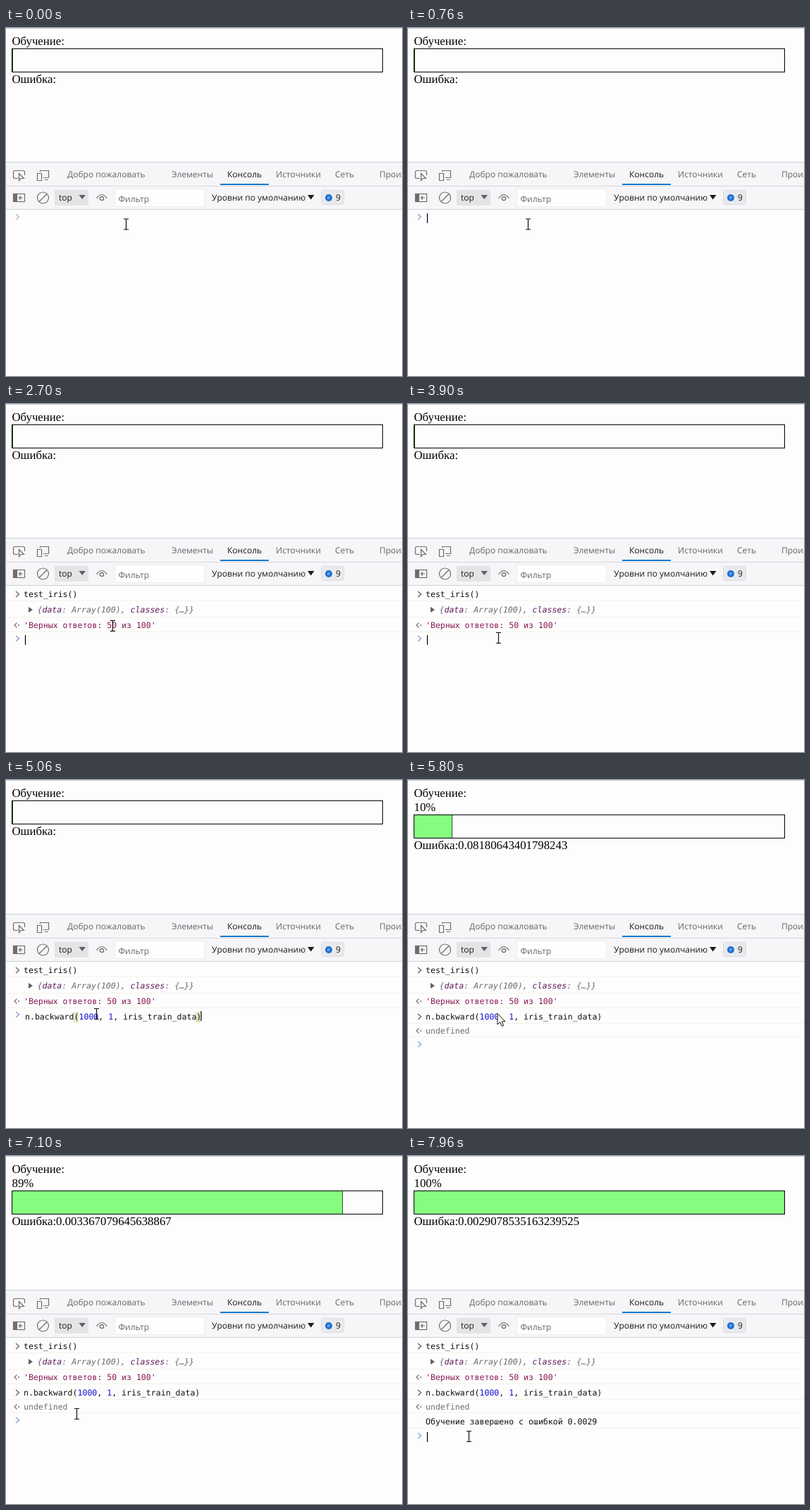
An HTML page that plays this animation: 562 by 494 pixels, repeating every 8 s.

```html
<!DOCTYPE html>
<html lang="ru">
<head>
<meta charset="utf-8">
<style>
  html, body { margin: 0; width: 100%; height: 100%; overflow: hidden; background: #fdfdfd; }
  svg { display: block; width: 562px; height: 494px; }
  text { text-rendering: geometricPrecision; }
  .serif { font: 16.8px "Liberation Serif", serif; fill: #000; }
  .ui { font: 12px "Open Sans", sans-serif; fill: #66666a; }
  .dark { fill: #1c1c1c; }
  .mono { font: 11.55px "DejaVu Sans Mono", monospace; fill: #111; }
  .preview { font-style: italic; fill: #6c6c6c; }
  .icon { fill: none; stroke: #6e6e70; stroke-width: 1.2; }
</style>
</head>
<body>
<svg id="stage" viewBox="0 0 562 494"></svg>
<script>
const LOOP = 8000, BLINK = 530;
const RECALL_1 = 1200, ENTER_1 = 2410, RECALL_2 = 4900, ENTER_2 = 5560;
const TRAIN = 5635, STEP = 16.4, DONE = TRAIN + 100 * STEP;

const text = (x, y, cls, s) => `<text x="${x}" y="${y}" class="${cls}">${s}</text>`;
const rect = (x, y, w, h, attrs) => `<rect x="${x}" y="${y}" width="${w}" height="${h}" ${attrs}/>`;
const path = (d, attrs) => `<path d="${d}" ${attrs}/>`;
const tint = (color, s) => `<tspan fill="${color}">${s}</tspan>`;
const hline = (y, color) => path(`M0 ${y}H562`, `stroke="${color}"`);
const group = (id, body) => `<g id="${id}">${body}</g>`;
const chevron = (y, color = '#606064') =>
  path(`M14 ${y - 4}l4.5 4-4.5 4`, `fill="none" stroke="${color}" stroke-width="1.3"`);
const reply = y =>
  path(`M15.5 ${y - 3.5}l-3.5 3.5 3.5 3.5`, 'fill="none" stroke="#707074" stroke-width="1.2"') +
  `<circle cx="18" cy="${y}" r="1.1" fill="#707074"/>`;
const divider = y => hline(y, '#f3f3ea');

const CALL_1 = 'test_iris()';
const CALL_2 = `n.backward(${tint('#1a10d0', '1000')}, ${tint('#1a10d0', '1')}, iris_train_data)`;
const key = s => tint('#5c1a58', s);

const page =
  hline(0.5, '#cacad4') +
  text(8.5, 24, 'serif', 'Обучение:') +
  '<text id="percent" x="8.5" y="44" class="serif"></text>' +
  group('lower',
    '<rect id="fill" x="9" y="30" height="32" fill="#86fd80"/>' +
    '<path id="edge" stroke="#1c5a1c"/>' +
    rect(8.5, 29.5, 526, 33, 'fill="none" stroke="#000"') +
    '<text id="error" x="8.5" y="78" class="serif"></text>');

const tabs = [[87, 'Добро пожаловать'], [235, 'Элементы'], [314, 'Консоль'],
  [383, 'Источники'], [467, 'Сеть'], [530, 'Производительность']];

const toolbar =
  rect(0, 190, 562, 68, 'fill="#f6f6f8"') +
  hline(190.5, '#cbcbd6') + hline(224.5, '#d8d8de') + hline(257.5, '#d0d0da') +
  tabs.map(([x, s]) => text(x, 212, 'ui' + (s === 'Консоль' ? ' dark' : ''), s)).join('') +
  rect(304, 221, 69, 2, 'fill="#0a78d0"') +
  // inspect and device icons
  path('M17 213.5H12.5Q10.5 213.5 10.5 211.5V204.5Q10.5 202.5 12.5 202.5H24.5Q26.5 202.5 26.5 204.5V209M18.5 206.5V216.5L21 213.5H25.5Z', 'class="icon"') +
  path('M48.5 204V202.5H60.5V212.5H53M55 215.5H60M44.5 206.5H50.5V216.5H44.5Z', 'class="icon"') +
  // sidebar, clear, context, eye
  rect(10.5, 235.5, 16, 11, 'class="icon"') + rect(11, 236, 5, 10, 'fill="#6e6e70"') +
  path('M24 241H18.5M21 238.5L18.5 241L21 243.5', 'class="icon"') +
  '<circle cx="52.5" cy="241" r="8" class="icon"/>' + path('M47 246.5L58 235.5', 'class="icon"') +
  rect(69, 230, 48, 22, 'rx="2" fill="#e4e4e6"') + text(75, 245, 'ui dark', 'top') +
  path('M103.5 237H113L108.2 243Z', 'fill="#606064"') +
  path('M128.5 242Q136 231 143.5 242', 'class="icon"') +
  '<circle cx="136" cy="242" r="2.7" class="icon"/>' +
  rect(154.5, 228.5, 127, 25, 'fill="#fefefe" stroke="#ececee"') +
  text(159.5, 246.5, 'ui', 'Фильтр') +
  text(292, 245, 'ui dark', 'Уровни по умолчанию') + path('M428 237H437.5L432.7 243.5Z', 'fill="#1c1c1c"') +
  rect(447.5, 230.5, 32, 20, 'rx="2" fill="#e9e9ec" stroke="#dcdce0"') +
  '<circle cx="458" cy="241" r="5" fill="#1b6fd8"/>' +
  path('M456 240H460M456 242H459', 'stroke="#cfe0f8" stroke-width="0.8"') +
  text(468, 245, 'ui dark', '9');

const output =
  group('draft1',
    rect(90, 263, 14, 15, 'fill="#e6e6c4"') + path('M90 277.5H104', 'stroke="#8a8a70"') +
    text(27, 274, 'mono', CALL_1)) +
  group('run1',
    chevron(270) + text(25, 274, 'mono', CALL_1) + divider(279.5) +
    path('M32 288V296L38 292Z', 'fill="#606064"') +
    text(44.5, 296, 'mono preview', `{${key('data')}: Array(100), ${key('classes')}: {…}}`) + divider(302.5) +
    reply(314) +
    text(25, 318, 'mono', tint('#861a50', "'Верных ответов: 50 из 100'")) + divider(323.5)) +
  group('draft2',
    rect(96, 329, 7, 15, 'fill="#e6e6c4"') + rect(269, 329, 7, 15, 'fill="#e6e6c4"') +
    text(27, 340, 'mono', CALL_2)) +
  group('run2',
    chevron(336) + text(25, 340, 'mono', CALL_2) + divider(345.5) +
    reply(356) + text(25, 360, 'mono', tint('#707070', 'undefined')) + divider(364.5)) +
  group('finish', text(25, 381, 'mono', 'Обучение завершено с ошибкой 0.0029') + divider(386.5)) +
  group('prompt',
    group('idle', chevron(0, '#b8b8bc')) + group('active', chevron(0, '#86a0cc')) +
    '<path id="caret" d="M0 -5V9" stroke="#000" stroke-width="1.2"/>');

const pointers =
  group('beam', path('M-3.5 -7.5H-1Q0 -7.5 0 -6.5Q0 -7.5 1 -7.5H3.5M0 -6.5V6.5M-3.5 7.5H-1Q0 7.5 0 6.5Q0 7.5 1 7.5H3.5',
    'fill="none" stroke="#111" stroke-width="1.2"')) +
  group('arrow', path('M0 0V15.5L3.7 12.2L6.3 18L8.7 17L6.2 11.3H11Z',
    'fill="#fff" stroke="#111" stroke-linejoin="round"'));

const stage = document.getElementById('stage');
stage.innerHTML = rect(0, 0, 562, 494, 'fill="#fdfdfd"') + page + toolbar + output + pointers;
const el = {};
stage.querySelectorAll('[id]').forEach(n => el[n.id] = n);

const show = (node, on) => node.setAttribute('visibility', on ? 'visible' : 'hidden');
const move = (node, x, y) => node.setAttribute('transform', `translate(${x} ${y})`);

// Returns the segment of sorted points around v, with the fraction inside it.
function segment(points, v) {
  let i = points.length - 1;
  while (i > 0 && points[i][0] > v) i--;
  const a = points[i], b = points[i + 1] || a;
  return [a, b, a === b ? 0 : (v - a[0]) / (b[0] - a[0])];
}

// time, x, y
const MOUSE = [[0, 170.5, 278.5], [2550, 170.5, 278.5], [2900, 122, 371], [3000, 122, 371],
  [3280, 128.5, 332], [5560, 128.5, 332], [5600, 127, 331.5], [6750, 127, 331.5],
  [7060, 100.5, 366], [7250, 100.5, 366], [7600, 86.5, 398]];

function mouseAt(t) {
  const [a, b, u] = segment(MOUSE, t), e = u * u * (3 - 2 * u);
  return [a[1] + (b[1] - a[1]) * e, a[2] + (b[2] - a[2]) * e];
}

// percent, error
const ERRORS = [[0, 0.6127309415582736], [3, 0.3214067718293504], [10, 0.08180643401798243],
  [22, 0.02483160927715384], [50, 0.007370834445261389], [89, 0.003367079645638867],
  [100, 0.0029078535163239525]];

function errorAt(p) {
  const [a, b, u] = segment(ERRORS, p);
  return a[1] * (b[1] / a[1]) ** u;
}

function snap(t) {
  const k = Math.floor((Math.floor(t / 10) * 10 + 9.99) * 0.03);
  return Math.floor(k * 10 / 3) * 10;
}

// start, prompt y, caret x, blink start
const PROMPTS = [[0, 268, 27.5, 600], [RECALL_1, 268, 104.5, RECALL_1],
  [ENTER_1, 333, 27.5, ENTER_1], [RECALL_2, 333, 277, RECALL_2],
  [ENTER_2, 375, 27.5, 6400], [DONE, 397, 27.5, 6400]];

function render(t) {
  const training = t >= TRAIN;
  const p = training ? Math.min(100, Math.floor((t - TRAIN) / STEP)) : 0;
  const edge = p ? Math.min(534.5, Math.floor(10 + 5.25 * p) + 0.5) : 9.5;
  el.percent.textContent = training ? p + '%' : '';
  el.error.textContent = 'Ошибка:' + (training ? errorAt(p) : '');
  move(el.lower, 0, training ? 20 : 0);
  el.fill.setAttribute('width', edge - 9);
  el.edge.setAttribute('d', `M${edge} 30V62`);

  show(el.draft1, t >= RECALL_1 && t < ENTER_1);
  show(el.run1, t >= ENTER_1);
  show(el.draft2, t >= RECALL_2 && t < ENTER_2);
  show(el.run2, t >= ENTER_2);
  show(el.finish, t >= DONE);

  const [[, y, x, start]] = segment(PROMPTS, t);
  move(el.prompt, 0, y);
  move(el.caret, x, 0);
  show(el.idle, t < 600);
  show(el.active, t >= 600);
  show(el.caret, t >= start && Math.floor((t - start) / BLINK) % 2 === 0);

  const [mx, my] = mouseAt(t), arrow = t >= ENTER_2 && t < 6850;
  show(el.arrow, arrow);
  show(el.beam, !arrow);
  move(el.arrow, mx, my);
  move(el.beam, mx, my);
}

const t0 = performance.now();
function tick(now) {
  render(snap(Math.max(0, now - t0) % LOOP));
  requestAnimationFrame(tick);
}
render(0);
requestAnimationFrame(tick);
</script>
</body>
</html>
```
